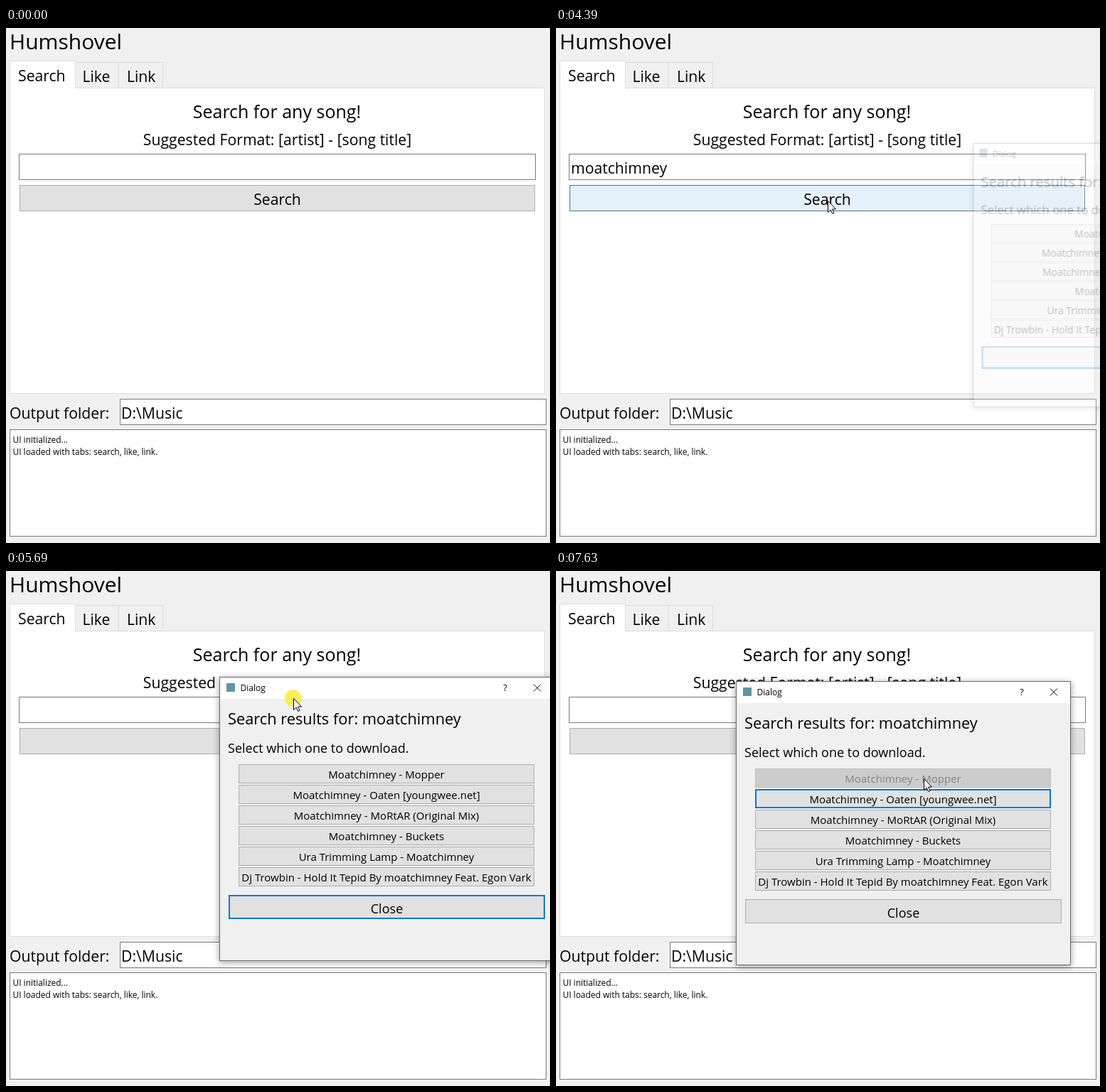
These frames come from a looping animation (765x725 px, 8 s). An HTML page:

```html
<!DOCTYPE html>
<html lang="en">
<head>
<meta charset="utf-8">
<title>Humshovel</title>
<style>
html, body { margin: 0; width: 100%; height: 100%; overflow: hidden; background: #f0f0f0; }
svg { display: block; width: 765px; height: 725px; font-family: "Open Sans", "Noto Sans", sans-serif; font-size: 21.2px; }
rect { shape-rendering: crispEdges; }
text { white-space: pre; }
.mid { text-anchor: middle; }
.box { fill: #fff; stroke: #7a7a7a; }
.btn { fill: #e1e1e1; stroke: #adadad; }
.edge { stroke: #dcdcdc; }
.ring { fill: none; stroke: #0078d7; stroke-width: 2; }
.log { font-size: 11.95px; }
.small { font-size: 15px; }
.medium { font-size: 18px; }

#field, #search, .row { animation: 8s linear infinite; }
#pointer, #arrow, #beam, #click, #dialog, #pop, #closeRing, #rowRing, #label1 { animation: 8s step-end infinite; }

#field { animation-name: field; }
@keyframes field {
  0%, 4.6% { stroke: #7a7a7a; }
  6.6%, 43.3% { stroke: #171717; }
  45.2% { stroke: #0c4a75; }
  47%, 48.1% { stroke: #0078d7; }
  50.1%, 100% { stroke: #7a7a7a; }
}
#search { animation-name: search; }
@keyframes search {
  0%, 44.3% { fill: #e1e1e1; stroke: #adadad; }
  45.2% { fill: #e1e6ee; stroke: #8c949c; }
  47%, 48% { fill: #e5f1fb; stroke: #0078d7; }
  48.1%, 49.1% { fill: #cce4f7; stroke: #005499; }
  50.1%, 60.6% { fill: #e4f0fa; stroke: #4a7696; }
  63.5%, 100% { fill: #e1e1e1; stroke: #adadad; }
}

#pointer { animation-name: pointer; }
@keyframes pointer {
  0% { transform: translate(440px, 800px); }
  .8% { transform: translate(440px, 628px); }
  1.8% { transform: translate(425px, 500px); }
  2.7% { transform: translate(408px, 370px); }
  3.7% { transform: translate(392px, 270px); }
  4.6% { transform: translate(380px, 212px); }
  5.6% { transform: translate(374px, 196px); }
  6.6% { transform: translate(373px, 194px); }
  43.3% { transform: translate(375px, 201px); }
  44.3% { transform: translate(381px, 217px); }
  45.2% { transform: translate(385px, 231px); }
  46.2% { transform: translate(384px, 240px); }
  47.1% { transform: translate(382px, 243px); }
  60.6% { transform: translate(440px, 236px); }
  61.6% { transform: translate(560px, 212px); }
  62.5% { transform: translate(650px, 185px); }
  63.5% { transform: translate(674px, 177px); }
  66.2% { transform: translate(660px, 174px); }
  67.2% { transform: translate(618px, 168px); }
  68.1% { transform: translate(558px, 161px); }
  69.1% { transform: translate(494px, 161px); }
  70.1% { transform: translate(443px, 171px); }
  71.1% { transform: translate(404px, 179px); }
  72% { transform: translate(369px, 183px); }
  73% { transform: translate(357px, 184px); }
  75.8% { transform: translate(385px, 225px); }
  76.8% { transform: translate(430px, 300px); }
  77.7% { transform: translate(465px, 360px); }
  78.7% { transform: translate(488px, 395px); }
  79.7% { transform: translate(500px, 402px); }
  80.7% { transform: translate(506px, 396px); }
  81.7% { transform: translate(510px, 368px); }
  82.7% { transform: translate(514px, 330px); }
  83.7% { transform: translate(516px, 297px); }
  84.6%, 100% { transform: translate(517px, 292px); }
}
#arrow { animation-name: arrow; }
@keyframes arrow {
  0% { opacity: 0; }
  1.8% { opacity: 1; }
  4.6% { opacity: 0; }
  44.3%, 100% { opacity: 1; }
}
#beam { animation-name: beam; }
@keyframes beam {
  0% { opacity: 1; }
  1.8% { opacity: 0; }
  4.6% { opacity: 1; }
  44.3%, 100% { opacity: 0; }
}
#click { animation-name: click; }
@keyframes click {
  0%, 8.3%, 50.1%, 74.8%, 87.5%, 100% { opacity: 0; }
  6.6%, 48.1%, 65.2%, 85.6% { opacity: .85; }
}

#dialog { animation-name: dialog; }
@keyframes dialog {
  0% { visibility: hidden; transform: translate(570px, 148px); }
  54.8% { visibility: visible; transform: translate(570px, 148px); }
  66.2% { visibility: visible; transform: translate(556px, 145px); }
  67.2% { visibility: visible; transform: translate(514px, 139px); }
  68.1% { visibility: visible; transform: translate(454px, 131px); }
  69.1% { visibility: visible; transform: translate(390px, 131px); }
  70.1% { visibility: visible; transform: translate(339px, 141px); }
  71.1% { visibility: visible; transform: translate(300px, 149px); }
  72% { visibility: visible; transform: translate(265px, 154px); }
  73%, 100% { visibility: visible; transform: translate(253px, 155px); }
}
#pop { transform-origin: 235px 200px; animation-name: pop; }
@keyframes pop {
  0% { opacity: .25; transform: scale(.93); }
  55.8% { opacity: .7; transform: scale(.97); }
  56.8% { opacity: .95; transform: scale(.99); }
  57.8%, 100% { opacity: 1; transform: none; }
}

#row1 { animation-name: row1; }
@keyframes row1 {
  0%, 76.7% { fill: #e1e1e1; stroke: #adadad; }
  76.8% { fill: #e3e9ee; stroke: #5f97c4; }
  79.7%, 82.7% { fill: #e1e1e1; stroke: #adadad; }
  83.7% { fill: #e2e6ea; stroke: #6f9fc9; }
  84.6%, 85.5% { fill: #e5f1fb; stroke: #0078d7; }
  85.6%, 86.6% { fill: #cce4f7; stroke: #005499; }
  87.5%, 95.2% { fill: #e5f1fb; stroke: #0078d7; }
  95.3%, 100% { fill: #ccc; stroke: #bfbfbf; }
}
#row2 { animation-name: row2; }
@keyframes row2 {
  0%, 81.7% { fill: #e1e1e1; stroke: #adadad; }
  82.7% { fill: #e4edf4; stroke: #3c8bce; }
  83.7% { fill: #e3e8ec; stroke: #5594c8; }
  85.6%, 100% { fill: #e1e1e1; stroke: #adadad; }
}
#row3 { animation-name: row3; }
@keyframes row3 {
  0%, 77.6%, 80.7%, 100% { fill: #e1e1e1; stroke: #adadad; }
  77.7% { fill: #e3e9ee; stroke: #5f97c4; }
}
#row4 { animation-name: row4; }
@keyframes row4 {
  0%, 80.7%, 83.6%, 100% { fill: #e1e1e1; stroke: #adadad; }
  81.7% { fill: #e3e9ee; stroke: #5f97c4; }
}
#row5 { animation-name: row5; }
@keyframes row5 {
  0%, 78.6%, 83.2%, 100% { fill: #e1e1e1; stroke: #adadad; }
  79.7%, 80.7% { fill: #e5f1fb; stroke: #0078d7; }
}
#label1 { animation-name: label1; }
@keyframes label1 {
  0% { fill: #000; }
  95.3%, 100% { fill: #838383; }
}
#closeRing { animation-name: closeRing; }
@keyframes closeRing {
  0% { opacity: 1; }
  85.6%, 100% { opacity: 0; }
}
#rowRing { animation-name: rowRing; }
@keyframes rowRing {
  0% { opacity: 0; transform: none; }
  87.5% { opacity: 1; transform: none; }
  95.3%, 100% { opacity: 1; transform: translateY(29px); }
}
</style>
</head>
<body>
<svg viewBox="0 0 765 725">
  <rect width="765" height="725" fill="#f0f0f0"/>
  <text x="5" y="30" font-size="30">Humshovel</text>

  <rect class="edge" x="5.5" y="84.5" width="752" height="430" fill="#fff"/>
  <rect class="edge" x="97.5" y="48.5" width="61" height="36" fill="#f0f0f0"/>
  <rect class="edge" x="158.5" y="48.5" width="62" height="36" fill="#f0f0f0"/>
  <path d="M5.5 85V46.5H97.5V85" class="edge" fill="#fff"/>
  <text x="17" y="75">Search</text>
  <text x="107.5" y="76">Like</text>
  <text x="170" y="76">Link</text>

  <text class="mid" x="381" y="126.5" font-size="25">Search for any song!</text>
  <text class="mid" x="381.5" y="165">Suggested Format: [artist] - [song title]</text>
  <rect id="field" class="box" x="18.5" y="177.5" width="726" height="36"/>
  <text id="typed" x="21" y="205"></text>
  <rect id="caret" y="180" width="1" height="31"/>
  <rect id="search" class="btn" x="19.5" y="221.5" width="724" height="36"/>
  <text class="mid" x="381.5" y="249">Search</text>

  <text x="5" y="550">Output folder:</text>
  <rect class="box" x="160.5" y="522.5" width="599" height="36"/>
  <text x="162" y="550">D:\Music</text>
  <rect class="box" x="5.5" y="565.5" width="754" height="150"/>
  <text class="log" x="9.5" y="584">UI initialized...</text>
  <text class="log" x="9.5" y="601">UI loaded with tabs: search, like, link.</text>

  <g id="dialog"><g id="pop">
    <rect x=".5" y=".5" width="470" height="399" fill="#f0f0f0" stroke="#6c6c6c" style="filter:drop-shadow(0 2px 5px #0006)"/>
    <rect x="1" y="1" width="469" height="30" fill="#fff"/>
    <rect x="10" y="9" width="12" height="12" fill="#5b97a3"/>
    <text x="29.5" y="20" font-size="12">Dialog</text>
    <text class="mid" x="402" y="20" font-size="13">?</text>
    <path d="M442 10.5l10 10m0-10l-10 10" stroke="#000" fill="none"/>
    <text x="12" y="67" font-size="21.8">Search results for: moatchimney</text>
    <text class="medium" x="12" y="107">Select which one to download.</text>
    <g id="rows" class="small mid"></g>
    <rect id="rowRing" class="ring" x="28" y="124" width="414" height="25"/>
    <rect class="btn" x="13.5" y="307.5" width="444" height="33"/>
    <rect id="closeRing" class="ring" x="14" y="308" width="443" height="32"/>
    <text class="medium mid" x="235.5" y="333">Close</text>
  </g></g>

  <g id="pointer">
    <circle id="click" r="12" fill="#ffee3a"/>
    <path id="beam" d="M-3.5-7.5h3m1 0h3M-3.5 8.5h3m1 0h3M.5-7v15" stroke="#000" fill="none"/>
    <path id="arrow" d="M.5.5V16.5L4.200 13 6.700 18.500 9 17.500 6.600 12H11.500Z" fill="#fff" stroke="#000"/>
  </g>
</svg>
<script>
const $ = id => document.getElementById(id);
const titles = [
  'Moatchimney - Mopper',
  'Moatchimney - Oaten [youngwee.net]',
  'Moatchimney - MoRtAR (Original Mix)',
  'Moatchimney - Buckets',
  'Ura Trimming Lamp - Moatchimney',
  'Dj Trowbin - Hold It Tepid By moatchimney Feat. Egon Vark'
];
$('rows').innerHTML = titles.map((title, i) => `
  <rect id="row${i + 1}" class="btn row" x="27.5" y="${123.5 + 29 * i}" width="415" height="26"/>
  <text id="label${i + 1}" x="235" y="${143 + 29 * i}">${title}</text>`).join('');

const word = 'moatchimney';
const keyTimes = [1300, 1450, 1680, 1910, 1990, 2220, 2370, 2450, 2600, 2770, 2840];
const clock = $('pointer').getAnimations()[0];
const typed = $('typed'), caret = $('caret');

function draw() {
  // Lead by one display frame, since this paints on the next one.
  const t = (clock.currentTime + 16) % 8000;
  const count = t < 4390 ? keyTimes.filter(k => k <= t).length : 0;
  const text = word.slice(0, count);
  if (typed.textContent !== text) typed.textContent = text;
  const blink = t >= 1220 && t < 1300;
  caret.setAttribute('opacity', t >= 670 && t < 3470 && !blink ? 1 : 0);
  caret.setAttribute('x', Math.round(21 + (count ? typed.getComputedTextLength() : 0)));
  requestAnimationFrame(draw);
}
draw();
</script>
</body>
</html>
```
